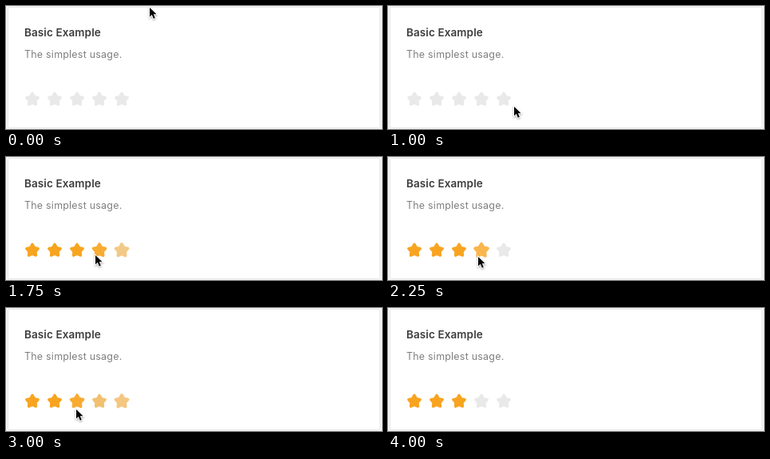
Write an HTML page that moves like this. It is 471x154 px and loops after 4250 ms.

```html
<!DOCTYPE html>
<html lang="en">
<head>
<meta charset="utf-8">
<title>Star rating</title>
<style>
  html, body { margin: 0; width: 100%; height: 100%; overflow: hidden; background: #f6f6f6; }
  svg { display: block; }
  text { font-family: Inter, "Open Sans", sans-serif; }
  .title { font-size: 13.5px; font-weight: 600; letter-spacing: .1px; fill: #3c3c3c; }
  .note { font-size: 12.4px; letter-spacing: .26px; fill: #7e7e7e; }
  #cursor { filter: drop-shadow(0 1px 1px rgba(0, 0, 0, .35)); }
</style>
</head>
<body>
<svg width="471" height="154" viewBox="0 0 471 154">
  <rect x="2.5" y="1.5" width="466" height="151" rx="2" fill="#fff" stroke="#e6e6e6"/>
  <text class="title" x="23" y="38">Basic Example</text>
  <text class="note" x="23" y="65">The simplest usage.</text>
  <g id="stars" stroke-width="3.4" stroke-linejoin="round"></g>
  <path id="cursor" d="M1 2V13.6L3.8 11 5.8 15.8 7.8 15 5.8 10.3H9.5Z"
    stroke="#fff" stroke-width="1.8" paint-order="stroke"/>
</svg>
<script>
const LOOP = 4250, STEP = 250, FADE = 300, LEAVE = 3650;
const GREY = [233, 233, 233], GOLD = [248, 164, 32];
const cursor = document.getElementById('cursor');
const group = document.getElementById('stars');

// Cursor path: time, x, y
const path = [
  [0, 179, 0], [250, 180, 26], [500, 164, 131], [750, 150, 127], [1000, 157, 124],
  [1250, 143, 121], [1500, 142, 121], [1750, 111, 121], [2250, 112, 123],
  [2500, 141, 127], [2750, 140, 123], [3000, 87, 125], [LOOP, 87, 124]
];

// Rating changes: time, lit stars, hovered star (0 for none)
const ratings = [[-FADE, 0, 0], [1150, 5, 5], [1620, 4, 4], [2370, 5, 5], [2880, 3, 3], [LEAVE, 3, 0]];

const mix = (a, b, p) => a + (b - a) * p;

const points = Array.from({ length: 10 }, (_, i) => {
  const r = i % 2 ? 4.2 : 7.6, a = i * Math.PI / 5;
  return [r * Math.sin(a), -r * Math.cos(a)].map(v => v.toFixed(2));
}).join(' ');

const stars = Array.from({ length: 5 }, () => {
  const star = document.createElementNS('http://www.w3.org/2000/svg', 'polygon');
  star.setAttribute('points', points);
  return group.appendChild(star);
});

function paint(star, i, fill, hover) {
  // Hovering lets 20% of the white card through
  const rgb = GREY.map((g, k) => Math.round(mix(mix(g, GOLD[k], fill), 255, .2 * hover)));
  const color = `rgb(${rgb})`;
  star.setAttribute('fill', color);
  star.setAttribute('stroke', color);
  star.setAttribute('transform', `translate(${33 + 28 * i} 117) scale(${1 + .1 * hover})`);
}

function drawStars(t) {
  const n = ratings.findLastIndex(r => r[0] <= t);
  const [begin, lit, hovered] = ratings[n];
  const [, oldLit, oldHovered] = ratings[Math.max(n - 1, 0)];
  const p = Math.min((t - begin) / FADE, 1);
  stars.forEach((star, i) => paint(star, i,
    mix(i < oldLit, i < lit, p),
    mix(i + 1 === oldHovered, i + 1 === hovered, p)));
}

function drawCursor(t) {
  const n = path.findIndex(key => key[0] > t);
  const [t0, x0, y0] = path[n - 1], [t1, x1, y1] = path[n];
  const p = (t - t0) / (t1 - t0);
  cursor.style.display = t < LEAVE ? '' : 'none';
  cursor.setAttribute('transform', `translate(${mix(x0, x1, p)} ${mix(y0, y1, p)})`);
}

function draw(now) {
  const t = Math.floor(now % LOOP / STEP) * STEP;
  drawStars(t);
  drawCursor(t);
}

let start;
function tick(now) {
  start ??= now;
  draw(now - start);
  requestAnimationFrame(tick);
}
draw(0);
requestAnimationFrame(tick);
</script>
</body>
</html>
```
